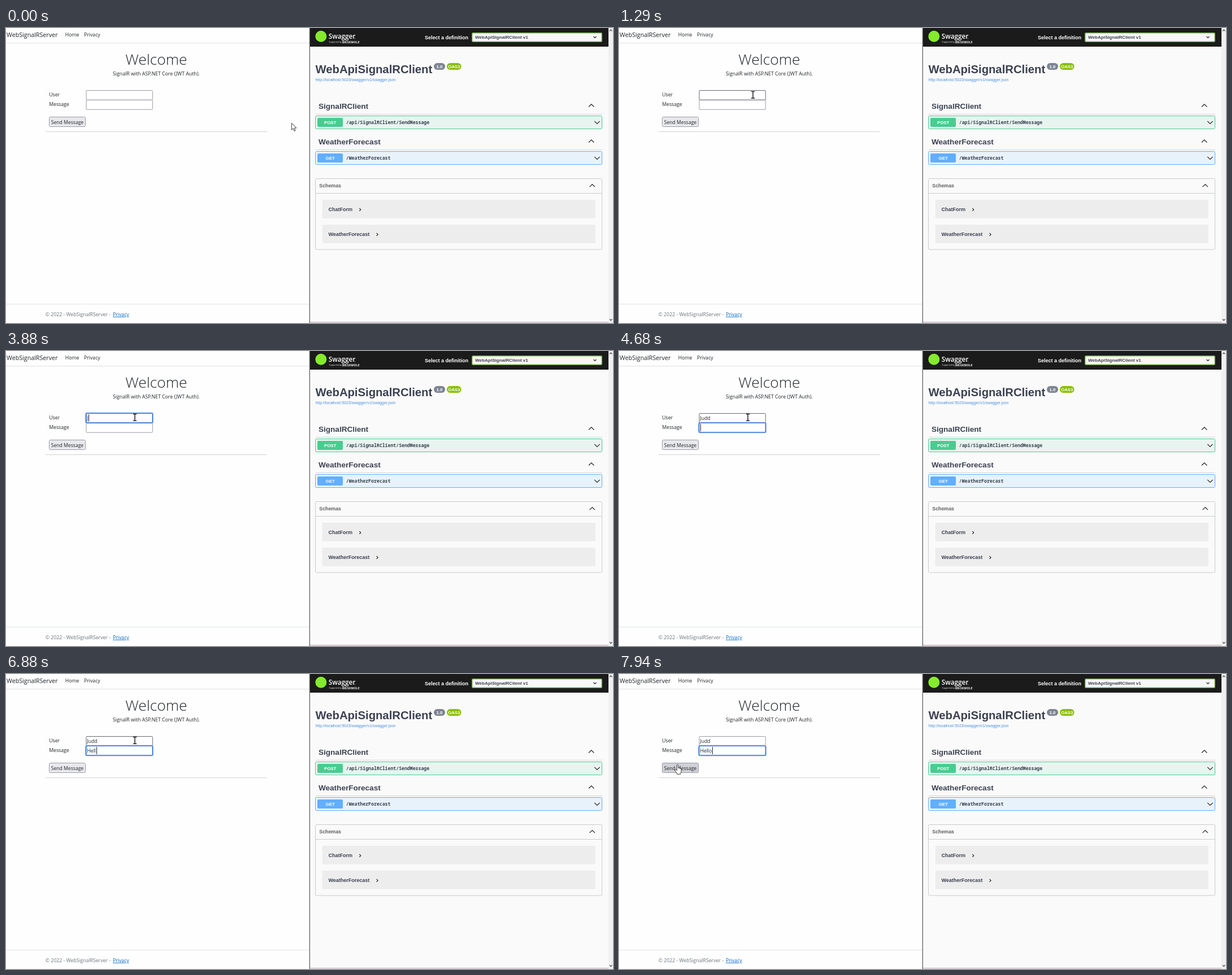
An HTML page for the animation above (8000 ms loop, 1074x522 px).

```html
<!DOCTYPE html>
<html lang="en">
<head>
<meta charset="utf-8">
<title>Chat form demo</title>
<style>
  html, body { margin: 0; width: 100%; height: 100%; overflow: hidden; background: #fff; }
  svg { display: block; }
  .page { font-family: "Open Sans", "Noto Sans", sans-serif; font-size: 8.7px; fill: #212529; }
  .api { font-family: "Liberation Sans", Arial, sans-serif; font-weight: 700; fill: #3b4151; }
  .mono { font-family: "Noto Sans Mono", "DejaVu Sans Mono", monospace; font-size: 8.2px; }
  .white { fill: #fff; }
  .mid { text-anchor: middle; }
  .chevron { fill: none; stroke: #222; stroke-width: 1.2; }
</style>
</head>
<body>
<svg width="1074" height="522" viewBox="0 0 1074 522">
  <g class="page">
    <rect width="537" height="522" fill="#fefefe"/>
    <path d="M0 26.5H537" stroke="#e4e6e8"/>
    <path d="M0 27.5H537" stroke="#f6f7f8"/>
    <text x="1" y="15.6" font-size="10.7">WebSignalRServer</text>
    <text x="104.8" y="15">Home</text>
    <text x="138" y="15">Privacy</text>
    <text class="mid" x="265.8" y="64.5" font-size="26.4" font-weight="300">Welcome</text>
    <text class="mid" x="265.8" y="84.3" font-size="8.75">SignalR with ASP.NET Core (JWT Auth).</text>
    <text x="76.2" y="120.6">User</text>
    <text x="76.2" y="137.6">Message</text>
    <path d="M70 183.5H461.5" stroke="#d0d1d2"/>
    <path d="M0 488.5H537" stroke="#dee2e6"/>
    <text x="69.8" y="509.8" fill="#6c757d">© 2022 - WebSignalRServer -</text>
    <text x="189" y="509.8" fill="#0366c6" text-decoration="underline">Privacy</text>

    <g id="fields"></g>
    <rect id="button" x="76.5" y="157.5" width="64" height="17" rx="2" stroke="#9a9aa6"/>
    <text class="mid" x="108.5" y="169.6" font-size="8.6">Send Message</text>
  </g>

  <g class="api">
    <rect x="537" width="529" height="522" fill="#fafafa"/>
    <rect x="537" width="529" height="33" fill="#1b1b1b"/>
    <path d="M537.3 0V522" stroke="#6c6c6c" stroke-width="1.4"/>
    <path d="M538 520.5H1066" stroke="#b9a0ab"/>
    <rect x="1066" width="8" height="522" fill="#f0f0f0"/>
    <path class="chevron" d="M1068 5.5l2.2-2.5 2.2 2.5M1068 515l2.2 2.5 2.2-2.5" style="stroke:#555"/>

    <circle cx="557.3" cy="14.8" r="10" fill="#85ea2d"/>
    <g font-family="Open Sans, Noto Sans, sans-serif" class="white">
      <text x="570.8" y="19" font-size="11.7" font-weight="600">Swagger</text>
      <circle cx="617.5" cy="18.8" r=".5"/>
      <text x="571.5" y="26.4" font-size="3.6" font-weight="400">Supported by</text>
      <text x="595" y="26.6" font-size="4.9" letter-spacing=".3">BRISKMOLE</text>
    </g>
    <text class="white" x="741" y="19.8" font-size="9">Select a definition</text>
    <rect x="824.75" y="8.75" width="229.5" height="15.5" rx="1.5" fill="#f7f7f7" stroke="#6fae4a" stroke-width="1.5"/>
    <text x="830" y="19.2" font-size="8.1">WebApiSignalRClient v1</text>
    <path class="chevron" d="M1039.5 15l2.5 2.5 2.5-2.5"/>

    <text x="547.5" y="80" font-size="20.25">WebApiSignalRClient</text>
    <rect x="757" y="62" width="20" height="12" rx="6" fill="#7d8492"/>
    <text class="white mid" x="767" y="71" font-size="7.8">1.0</text>
    <rect x="780" y="62" width="25.5" height="12" rx="6" fill="#89bf04"/>
    <text class="white mid" x="792.8" y="71" font-size="7.8">OAS3</text>
    <text x="547.5" y="94" font-size="6.95" font-weight="400" fill="#4990e2">http://localhost:5023/swagger/v1/swagger.json</text>

    <g id="operations"></g>

    <rect x="547.5" y="266.5" width="507" height="125.5" rx="2" fill="none" stroke="#c9cbce"/>
    <path d="M548 292.5H1054" stroke="#c9cbce"/>
    <text x="554.3" y="281.8" font-size="8.8" fill="#606060">Schemas</text>
    <path class="chevron" d="M1032.6 281.2l4.7-4.7 4.7 4.7"/>
    <g id="schemas"></g>
  </g>
  <g id="cursor"></g>
</svg>
<script>
const LOOP = 8000;
const byId = id => document.getElementById(id);

// Static rows of the API page, placed by the top edge of each bar
const operation = (y, title, verb, path, color, tint) => `
  <text x="553" y="${y - 13}" font-size="13.55">${title}</text>
  <path class="chevron" d="M1031 ${y - 16}l4.7-4.7 4.7 4.7"/>
  <path d="M548 ${y - 3}H1055" stroke="#d3d5d8"/>
  <rect x="547.5" y="${y}" width="507" height="23" rx="2" fill="${tint}" stroke="${color}"/>
  <rect x="551" y="${y + 3.5}" width="45" height="16" rx="2" fill="${color}"/>
  <text class="white mid" x="573.7" y="${y + 14.2}" font-size="7.9">${verb}</text>
  <text class="mono" x="601.8" y="${y + 14.7}">${path}</text>
  <path class="chevron" d="M1041.2 ${y + 9.3}l4.7 4.7 4.7-4.7"/>`;
byId("operations").innerHTML =
  operation(155.5, "SignalRClient", "POST", "/api/SignalRClient/SendMessage", "#49cc90", "#e8f4ef") +
  operation(218.5, "WeatherForecast", "GET", "/WeatherForecast", "#61affe", "#e8f2fb");

const schema = (y, name, chevronX) => `
  <rect x="559.5" y="${y}" width="483.5" height="32.7" rx="2" fill="#ededed"/>
  <text x="570.5" y="${y + 19.7}" font-size="9">${name}</text>
  <path class="chevron" d="M${chevronX} ${y + 14.9}l2.4 2.5-2.4 2.5"/>`;
byId("schemas").innerHTML = schema(304, "ChatForm", 625.3) + schema(348, "WeatherForecast", 655.6);

// Form fields
const fields = [
  { y: 110, text: "Judd", keys: [3880, 4080, 4280, 4480], focus: [1360, 4680],
    caret: [[1430, 2040], [2560, 3090], [3620, 4680]] },
  { y: 127, text: "Hello", keys: [5360, 5560, 5760, 5950, 6950], focus: [4680, LOOP],
    caret: [[4680, 5300], [5360, 6350], [6880, 7480], [7940, LOOP]] }
];
byId("fields").innerHTML = fields.map(({ y }) => `
  <g>
    <rect class="box" x="142" y="${y + .5}" width="117.3" height="16.7" rx="1" fill="#fff"/>
    <g class="ring" fill="none">
      <rect x="140.5" y="${y - 1}" width="120" height="19" rx="2.5" stroke="#a9c8f5"/>
      <rect x="141.6" y="${y + .1}" width="117.8" height="16.8" rx="1.5" stroke="#2a70dc" stroke-width="1.4"/>
    </g>
    <text x="143.4" y="${y + 12}"></text>
    <path class="caret" d="M.5 ${y + 2}v13" stroke="#222"/>
  </g>`).join("");
[...byId("fields").children].forEach((group, i) => {
  const [box, ring, text, caret] = group.children;
  Object.assign(fields[i], { group, box, ring, label: text, bar: caret });
});

// Pointer shapes, each with its hot spot at 0,0
const shapes = {
  arrow: `<path d="M.3 .3V12.2L3 9.7 5 14.4 7 13.5 5.1 9H8.8Z" fill="#fff" stroke="#222" stroke-width=".9"/>`,
  beam: `<path d="M-3.2 -5.9H-1Q0 -5.9 0 -5Q0 -5.9 1 -5.9H3.2M0 -5.5V5.5M-3.2 5.9H-1Q0 5.9 0 5Q0 5.9 1 5.9H3.2"
    fill="none" stroke="#111" stroke-width="1.4"/>`,
  hand: `<path d="M-1.4 1Q-1.4 -.3 -.2 -.3T1.1 1V6Q1.7 5 2.7 5.6L3 6.5Q4 5.6 4.8 6.7V7.4Q6.3 6.8 6.4 8.3V11.5
    Q6.4 13.7 5 15V16.7H-1.2V15.3L-4.9 10.4Q-5.5 9 -4.2 8.6T-1.4 10.2Z" fill="#fff" stroke="#222" stroke-width=".9"/>`
};

const lerp = (a, b, p) => a + (b - a) * p;
const ease = p => p * p * (3 - 2 * p);
const within = (t, [from, to]) => t >= from && t < to;

function stepped(t, from, to, steps) {
  if (t < from) return 0;
  const step = Math.floor((t - from) / (to - from) * (steps - 1) + 1e-6) + 1;
  return ease(Math.min(1, step / steps));
}

function pointer(t) {
  if (t < 1360) {
    const p = stepped(t, 530, 1290, 11);
    return [lerp(505, 237, p), lerp(168, 118.3, p)];
  }
  if (t < 7410) {
    const p = stepped(t, 1360, 1570, 4);
    return [lerp(237, 228, p), lerp(118.3, 117.5, p)];
  }
  const p = stepped(t, 7410, 7940, 8), q = 1 - p;
  const curve = (a, b, c) => q * q * a + 2 * q * p * b + p * p * c;
  return [curve(228, 165, 103.8), curve(117.5, 182, 160.5)];
}

function draw(t) {
  const [x, y] = pointer(t);
  const overField = top => x > 142 && x < 260 && y >= top && y < top + 17;
  const overButton = x > 76 && x < 141 && y > 157 && y < 175;

  for (const f of fields) {
    const focused = within(t, f.focus);
    f.box.setAttribute("stroke", overField(f.y) ? "#676774" : "#9a9aa6");
    f.ring.style.display = focused ? "" : "none";
    f.label.textContent = f.text.slice(0, f.keys.filter(k => t >= k).length);
    const end = 144 + Math.round(f.label.textContent ? f.label.getComputedTextLength() : 0);
    f.bar.setAttribute("transform", `translate(${end} 0)`);
    f.bar.style.display = f.caret.some(span => within(t, span)) ? "" : "none";
  }
  // The focused field lies above its neighbour
  const top = fields[t < 4680 ? 0 : 1].group;
  if (top.parentNode.lastChild !== top) top.parentNode.append(top);

  byId("button").setAttribute("fill", overButton ? "#d0d0d7" : "#e9e9ed");
  const kind = overButton ? "hand" : fields.some(f => overField(f.y)) ? "beam" : "arrow";
  const cursor = byId("cursor");
  if (cursor.dataset.kind !== kind) {
    cursor.dataset.kind = kind;
    cursor.innerHTML = shapes[kind];
  }
  cursor.setAttribute("transform", `translate(${x.toFixed(1)} ${y.toFixed(1)})`);
}

const start = performance.now();
function tick() {
  draw((performance.now() - start) % LOOP);
  requestAnimationFrame(tick);
}
tick();
</script>
</body>
</html>
```
